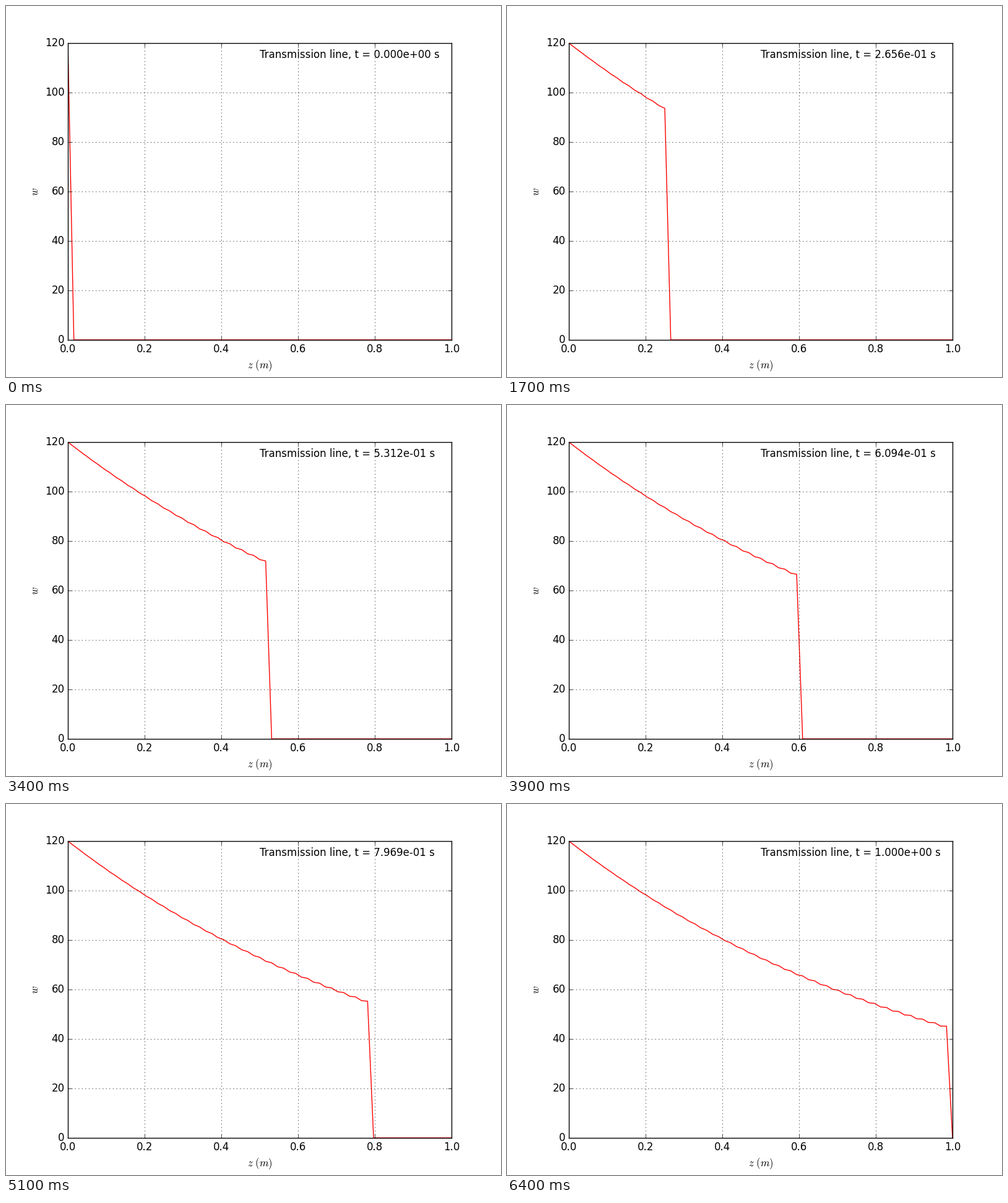
A matplotlib script that plays this animation: 800x600 px, repeating every 6.5 s.

```python
import numpy as np
import matplotlib.pyplot as plt
from matplotlib.animation import FuncAnimation

CELLS = 64
STEP = 1 / CELLS
LEVEL = 120


def solve():
    """Damped wave equation w_tt + 2 w_t + w = w_zz, centred differences."""
    w = np.zeros((CELLS + 1, CELLS + 1))
    w[:, 0] = LEVEL
    for n in range(1, CELLS):
        now, before = w[n], w[n - 1]
        w[n + 1, 1:-1] = (now[2:] + now[:-2]
                          - (1 - STEP) * before[1:-1]
                          - STEP ** 2 * now[1:-1]) / (1 + STEP)
    return w


plt.style.use("classic")
plt.rcParams["font.family"] = "DejaVu Sans"

z = np.linspace(0, 1, CELLS + 1)
waves = solve()

fig = plt.figure(figsize=(8, 6), dpi=100, facecolor="white")
ax = fig.add_subplot(111)
ax.set_xlim(0, 1)
ax.set_ylim(0, LEVEL)
ax.grid(True)
ax.set_xlabel(r"$z \ (m)$")
ax.set_ylabel(r"$w$")
line, = ax.plot([], [], "r")
label = ax.text(0.5, 0.95, "", transform=ax.transAxes)


def draw(n):
    line.set_data(z, waves[n])
    label.set_text(f"Transmission line, t = {n * STEP:.3e} s")
    return line, label


anim = FuncAnimation(fig, draw, frames=CELLS + 1, interval=100,
                     repeat=True, repeat_delay=0, blit=False)
plt.show()
```
